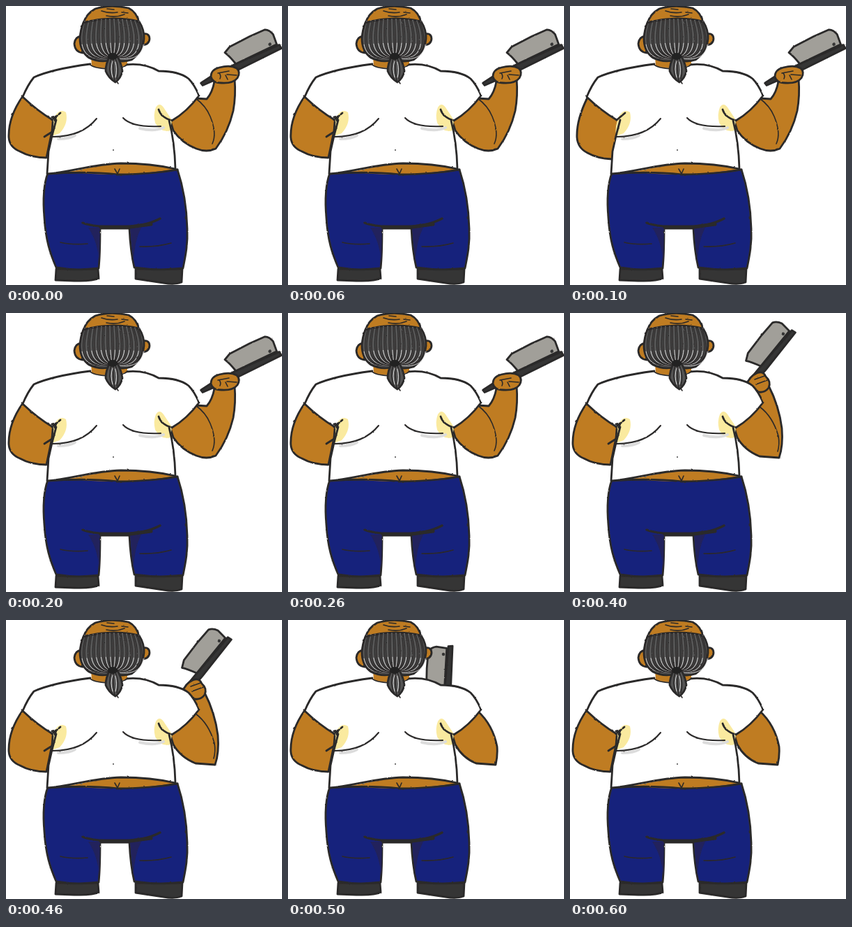
These frames come from a looping animation (396x399 px, 700 ms). An HTML page:

```html
<!DOCTYPE html>
<html lang="en">
<head>
<meta charset="utf-8">
<title>Cook with a cleaver</title>
<style>
html, body { margin: 0; width: 100%; height: 100%; overflow: hidden; background: #fff; }
svg { display: block; width: 100%; height: 100%; }
.ink { fill: none; stroke: #2c2929; stroke-width: 2.8; stroke-linecap: round; stroke-linejoin: round; }
.thin { stroke-width: 1.6; }
.skin { fill: #bf7b20; }
.white { fill: #fff; }
.blue { fill: #19217c; }
.navy { fill: #20245c; }
.dark { fill: #343434; }
.grey { fill: #a19f99; }
.hair { fill: #555; }
.stain { fill: #faea9f; }
.shade { fill: none; stroke: #dcdcdc; stroke-width: 4; stroke-linecap: round; }
</style>
</head>
<body>
<svg viewBox="0 0 396 399">
  <filter id="rough" x="0" y="0" width="396" height="399" filterUnits="userSpaceOnUse">
    <feTurbulence type="fractalNoise" baseFrequency=".15" numOctaves="2" seed="4"/>
    <feDisplacementMap in="SourceGraphic" scale="1.8" xChannelSelector="R" yChannelSelector="G"/>
  </filter>
  <g filter="url(#rough)">
    <!-- moving parts, all behind the shirt and head -->
    <g id="cleaver">
      <path class="ink dark" d="M-125 0L-101 -4L-68 -5L0 -5L1 1L-66 4L-100 4L-124 4Z"/>
      <path class="ink grey" d="M-76 -26Q-72 -19 -68 -5L-3 -7L-2 -22Q-4 -30 -10 -33L-34 -33L-66 -31Z"/>
      <circle class="dark" cx="-12" cy="-11" r="2.3"/>
    </g>
    <path id="rightArm" class="ink skin"/>
    <path id="hand" class="ink skin"/>
    <path id="creases" class="ink thin"/>
    <path id="leftArm" class="ink skin"/>

    <!-- shoes and trousers -->
    <path class="ink dark" d="M72 376L132 376L133 389Q124 394 98 393L71 392Z"/>
    <path class="ink dark" d="M186 376L253 376L252 395Q242 399 226 396L186 390Z"/>
    <path class="ink blue" d="M60 239C54 255 53 280 55 303C57 335 63 353 72 374Q100 379 133 375C135 355 135 335 135 318L177 318C178 340 180 357 184 374Q218 379 254 375C258 355 261 340 260 318C259 280 253 255 246 234Z"/>
    <path class="navy" d="M118 317L135 317L134 366Q131 336 118 317ZM178 317L194 317Q184 336 183 366Z"/>
    <path class="ink" style="stroke-width:3.5" d="M110 310Q122 315 148 316Q195 318 221 304"/>
    <path class="ink" style="stroke-width:5" d="M136 316L178 316L208 312"/>
    <path class="ink thin" d="M78 338Q95 342 117 340M192 344Q216 345 237 339"/>

    <!-- shirt -->
    <path class="white" d="M121 83C98 86 62 92 40 102Q31 113 24 130Q45 150 67 163L72 164Q66 184 61 208L59 240Q150 220 243 233C244 208 240 184 234 165Q260 151 277 128Q270 112 262 104Q248 93 219 93Q198 81 172 84Z"/>
    <path class="stain" d="M70 158Q77 146 86 152Q90 168 77 182L66 186Q64 172 70 158ZM215 145Q220 137 226 145L238 163L236 178Q222 182 214 167Q211 155 215 145Z"/>
    <path class="shade" d="M75 190Q91 190 99 185M192 175Q212 180 226 174"/>
    <path class="skin" d="M90 237C115 233 140 226 165 225Q208 225 243 233Q202 240 160 241Q120 241 90 237Z"/>
    <path class="ink" d="M60 240C95 237 125 226 165 225Q208 225 243 233M60 240Q115 236 160 241Q215 240 246 234"/>
    <path class="ink thin" d="M156 233L160 240L163 233"/>
    <path class="ink" d="M121 83C98 86 62 92 40 102Q31 113 24 130Q45 150 67 163M72 163Q66 184 61 208L59 240M172 84Q198 81 219 93Q248 93 262 104Q270 112 277 128Q260 151 238 164M219 148Q222 159 238 164M234 164Q242 194 243 233"/>
    <path class="ink" style="stroke-width:2.1" d="M67 187Q109 187 130 161M168 160C178 171 200 173 222 172"/>
    <path id="armpit" class="ink"/>
    <circle class="dark" cx="154" cy="206" r=".9"/>

    <!-- neck and head -->
    <path class="skin" d="M122 72L176 72L173 85Q148 93 123 86Z"/>
    <path class="ink thin" d="M120 83Q124 89 148 90Q169 90 174 83M159 108L161 111"/>
    <path class="ink skin" d="M108 43Q99 44 98 54Q99 66 110 67ZM195 40Q206 38 206 47Q205 56 194 56Z"/>
    <path class="ink skin" d="M111 25Q115 11 128 4Q150 -3 176 3Q188 9 191 24Z"/>
    <path class="ink thin" d="M137 7Q148 11 160 9M145 4L155 5M144 14Q158 17 170 12M166 9L175 10"/>
    <path class="ink hair" d="M111 24Q150 13 191 22Q199 35 198 47Q196 66 180 77Q168 81 153 77Q134 82 119 74Q106 65 106 46Q107 33 111 24Z"/>
    <g id="hair"></g>
    <path class="ink hair" d="M149 71Q143 83 143 93Q147 103 157 109Q165 103 167 93Q165 80 159 71Z"/>
    <path class="ink thin" d="M151 75Q146 90 152 104M154 74Q153 90 156 107M157 75Q163 90 159 104"/>
    <path class="ink thin" style="stroke:#eee;stroke-width:.9" d="M153 79Q149 90 153 102M157 80Q160 92 157 102"/>
    <ellipse cx="153" cy="72" rx="7" ry="5" fill="#222"/>
  </g>
</svg>
<script>
const $ = id => document.getElementById(id);
const STEP = 100;

// Hair runs from the hairline, bulges outwards and gathers in the knot.
const strands = 40;
let hair = '';
for (let i = 0; i <= strands; i++) {
  const d = -40 + 80 * i / strands;
  const droop = 62 + Math.abs(d) * 0.62;
  const light = i % 3 === 1;
  hair += `<path class="ink" d="M${151 + d} ${22 - 3 * Math.cos(d / 26)}C${152 + d * 1.2} 42 ${152 + d * 1.4} ${droop} 153 73"
    style="stroke-width:${light ? 0.9 : 1.3};${light ? 'stroke:#ddd;stroke-dasharray:0 34 60' : ''}"/>`;
}
$('hair').innerHTML = hair;

// Each pose: cleaver spine tip and angle, arm, hand, creases.
const raised = {
  tip: [394, 60, -23.7],
  arm: 'M299 108Q296 124 288 133L272 132L236 165L240 178Q252 196 273 204Q288 210 301 204Q319 180 326 150Q330 128 328 104Z',
  hand: 'M294 101Q294 91 306 88Q322 84 331 89Q337 95 332 103Q326 111 309 110Q296 110 294 101Z',
  creases: 'M306 96Q309 100 307 104M304 96L320 93M315 99L318 105M317 98L331 99M272 132Q287 143 293 158Q303 182 296 197'
};
const tilted = {
  tip: [383, 51, -28],
  arm: 'M291 107Q289 122 283 132L272 132L236 165L240 178Q252 196 273 204Q288 211 300 205Q317 186 322 160Q325 137 323 102Z',
  hand: 'M285 100Q285 91 299 88Q315 84 324 89Q329 95 325 103Q314 111 298 110Q288 109 285 100Z',
  creases: 'M298 96Q302 100 299 105M298 95L312 92M307 98L312 105M310 97L325 97M272 132Q286 143 292 158Q303 182 296 197'
};
const folded = {
  tip: [322, 28, -49],
  arm: 'M255 98L236 165L240 178Q250 196 272 205L300 207Q306 190 304 165Q300 133 285 104Z',
  hand: 'M254 102Q257 91 268 86Q277 82 281 91Q289 98 285 107Q278 116 267 112Q258 111 254 102Z',
  creases: 'M265 95L279 90M267 102L283 96M272 134Q291 148 299 176Q301 188 298 198'
};
const hidden = {
  arm: 'M272 130L236 165L240 178Q250 197 270 205L298 207Q301 194 300 181Q294 150 272 130Z',
  hand: '', creases: ''
};
const behindHead = { ...hidden, tip: [235, 38, -85] };
const poses = [raised, raised, raised, tilted, folded, behindHead, hidden];

const elbowOut = {
  arm: 'M24 129Q3 159 4 188Q5 202 20 208Q36 217 58 217L69 164Z',
  pit: 'M66 163L78 153M66 159L72 158L70 164M67 166L66 180L55 187'
};
const elbowIn = {
  arm: 'M25 131Q9 163 10 188Q11 203 25 210Q39 218 60 219L71 164Z',
  pit: 'M67 163L79 153'
};

function draw(now) {
  const beat = Math.floor(now / STEP) % poses.length;
  const { tip, arm, hand, creases } = poses[beat];
  const left = beat === 1 || beat === 3 ? elbowIn : elbowOut;
  const setPath = (id, d) => $(id).setAttribute('d', d);

  $('cleaver').style.display = tip ? '' : 'none';
  if (tip) $('cleaver').setAttribute('transform', `translate(${tip[0]} ${tip[1]}) rotate(${tip[2]})`);
  setPath('rightArm', arm);
  setPath('hand', hand);
  setPath('creases', creases);
  setPath('leftArm', left.arm);
  setPath('armpit', left.pit);
  requestAnimationFrame(draw);
}
draw(0);
</script>
</body>
</html>
```
